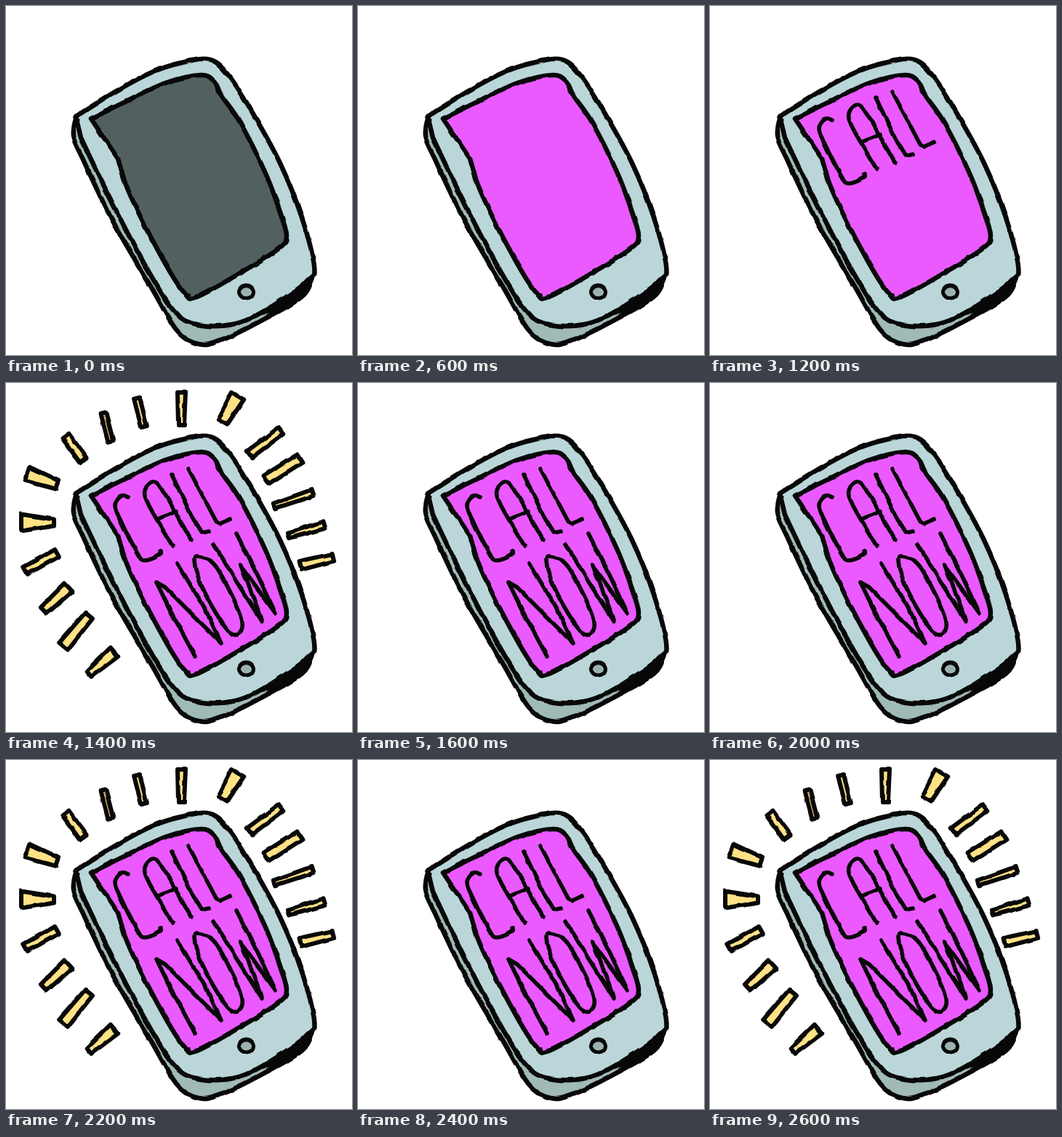
Write an HTML page that moves like this. It is 476 px wide and 480 px high and loops after 2800 ms.

```html
<!DOCTYPE html>
<html lang="en">
<head>
<meta charset="utf-8">
<title>Call now</title>
<style>
  html, body { margin: 0; width: 100%; height: 100%; overflow: hidden; background: #fff; }
  svg { display: block; width: 100%; height: 100%; }
  path, ellipse { stroke: #080808; stroke-width: 6.5; stroke-linejoin: round; stroke-linecap: round; fill: none; }
  .side { fill: #a0bab8; }
  .face { fill: #bad6d8; }
  .shadow { fill: #080808; stroke-width: 4; }
  .screen { fill: #526060; animation: light 2800ms step-end infinite; }
  .button { fill: #9ab3b2; stroke-width: 5; }
  .letter { stroke-width: 5.6; }
  .ray { fill: #ffe186; stroke-width: 6; }
  #call { animation: call 2800ms step-end infinite; }
  #now { animation: now 2800ms step-end infinite; }
  #rays { animation: blink 400ms step-end infinite; }
  @keyframes light { 0% { fill: #526060; } 21.42%, 100% { fill: #ea5aff; } }
  @keyframes call { 0% { opacity: 0; } 42.85%, 100% { opacity: 1; } }
  @keyframes now { 0% { opacity: 0; } 49.99%, 100% { opacity: 1; } }
  @keyframes blink { 0% { opacity: 0; } 49.95%, 100% { opacity: 1; } }
</style>
</head>
<body>
<svg viewBox="0 0 476 480" role="img" aria-label="Phone: call now">
  <filter id="rough" filterUnits="userSpaceOnUse" x="0" y="0" width="476" height="480" color-interpolation-filters="sRGB">
    <feTurbulence type="fractalNoise" baseFrequency=".06" numOctaves="1" seed="4"/>
    <feDisplacementMap in="SourceGraphic" scale="4" xChannelSelector="R" yChannelSelector="G"/>
  </filter>
  <g filter="url(#rough)">
    <g id="phone"></g>
    <g id="call"></g>
    <g id="now"><g id="rays"></g></g>
  </g>
</svg>
<script>
const add = (parent, cls, d) => {
  const path = document.createElementNS('http://www.w3.org/2000/svg', 'path');
  path.setAttribute('class', cls);
  path.setAttribute('d', d);
  document.getElementById(parent).append(path);
};

// Smooth stroke through "x,y x,y ..." points, ends left sharp.
const curve = text => {
  const p = text.split(' ').map(pair => pair.split(',').map(Number));
  const at = i => p[Math.max(0, Math.min(p.length - 1, i))];
  const handle = (i, side) => at(i).map((v, k) => v + side * (at(i + 1)[k] - at(i - 1)[k]) / 6);
  return p.slice(1).reduce(
    (d, end, i) => `${d}C${handle(i, 1)} ${handle(i + 1, -1)} ${end}`, `M${p[0]}`);
};

// Tapered bar from its outer end to its inner end.
const ray = (x1, y1, x2, y2, outer = 11, inner = outer) => {
  const length = Math.hypot(x2 - x1, y2 - y1);
  const nx = (y1 - y2) / length / 2, ny = (x2 - x1) / length / 2;
  const corner = (x, y, w) => `${x + nx * w},${y + ny * w}`;
  add('rays', 'ray', `M${corner(x1, y1, outer)}L${corner(x2, y2, inner)} ${corner(x2, y2, -inner)} ${corner(x1, y1, -outer)}Z`);
};

add('phone', 'side', curve('96,152 92,178 105,209 147,296 200,387 235,446 266,465 295,460 351,433 409,398 424,362') + 'Z');
add('phone', 'shadow', curve('350,423 399,394 423,373 408,397 367,421') + 'Z');
add('phone', 'face', curve('96,152 150,118 201,91 242,78 281,74 309,99 341,150 377,216 406,288 424,358 415,378 366,413 316,437 263,438 229,417 181,338 134,246 103,181') + 'Z');
add('phone', 'screen', curve('117,155 166,131 219,106 267,95 286,103 297,124 322,160 357,230 378,286 386,317 376,333 331,362 263,400 245,394 215,347 170,258 154,210') + 'Z');
add('phone', 'letter', 'M248 398h4');

add('call', 'letter', curve('168,157 159,155 150,168 158,190 180,233 190,244 211,237 213,231'));
add('call', 'letter', curve('229,224 197,169 191,148 204,136 219,154 254,215'));
add('call', 'letter', 'M209 187L235 176');
add('call', 'letter', 'M228 126L255 182 270 206 279 204');
add('call', 'letter', 'M251 118L289 190 293 194 309 187');

add('now', 'letter', 'M260 376L226 313 207 274 219 281 296 358 276 315 236 248');
add('now', 'letter', curve('269,240 259,243 271,284 304,339 321,344 323,320 290,254 269,240'));
add('now', 'letter', 'M286 222L315 270 352 328 337 286 323 251 371 317 347 266 317 207');
document.getElementById('now').append(document.getElementById('rays'));

ray(241.5, 13, 241, 57, 11, 8);
ray(180, 21, 190, 60, 8);
ray(134, 42, 144, 80, 7);
ray(82, 73, 106, 106);
ray(29, 125, 70, 140, 20, 12);
ray(21, 192, 66, 192, 23, 9);
ray(27, 258, 70, 234);
ray(52, 313, 86, 281, 12, 15);
ray(79, 362, 114, 320, 15, 13);
ray(114, 400, 149, 370, 10, 16);
ray(319, 18, 298, 54, 19, 14);
ray(378, 66, 335, 98);
ray(404, 104, 358, 133, 13);
ray(422, 151, 369, 169, 9, 7);
ray(438, 195, 389, 210, 10, 7);
ray(450, 240, 405, 251, 10, 12);
</script>
<svg width="0" height="0" aria-hidden="true"></svg>
<script>
const button = document.createElementNS('http://www.w3.org/2000/svg', 'ellipse');
Object.entries({ class: 'button', cx: 330.5, cy: 393, rx: 10, ry: 9 })
  .forEach(([name, value]) => button.setAttribute(name, value));
document.getElementById('phone').append(button);
</script>
</body>
</html>
```
